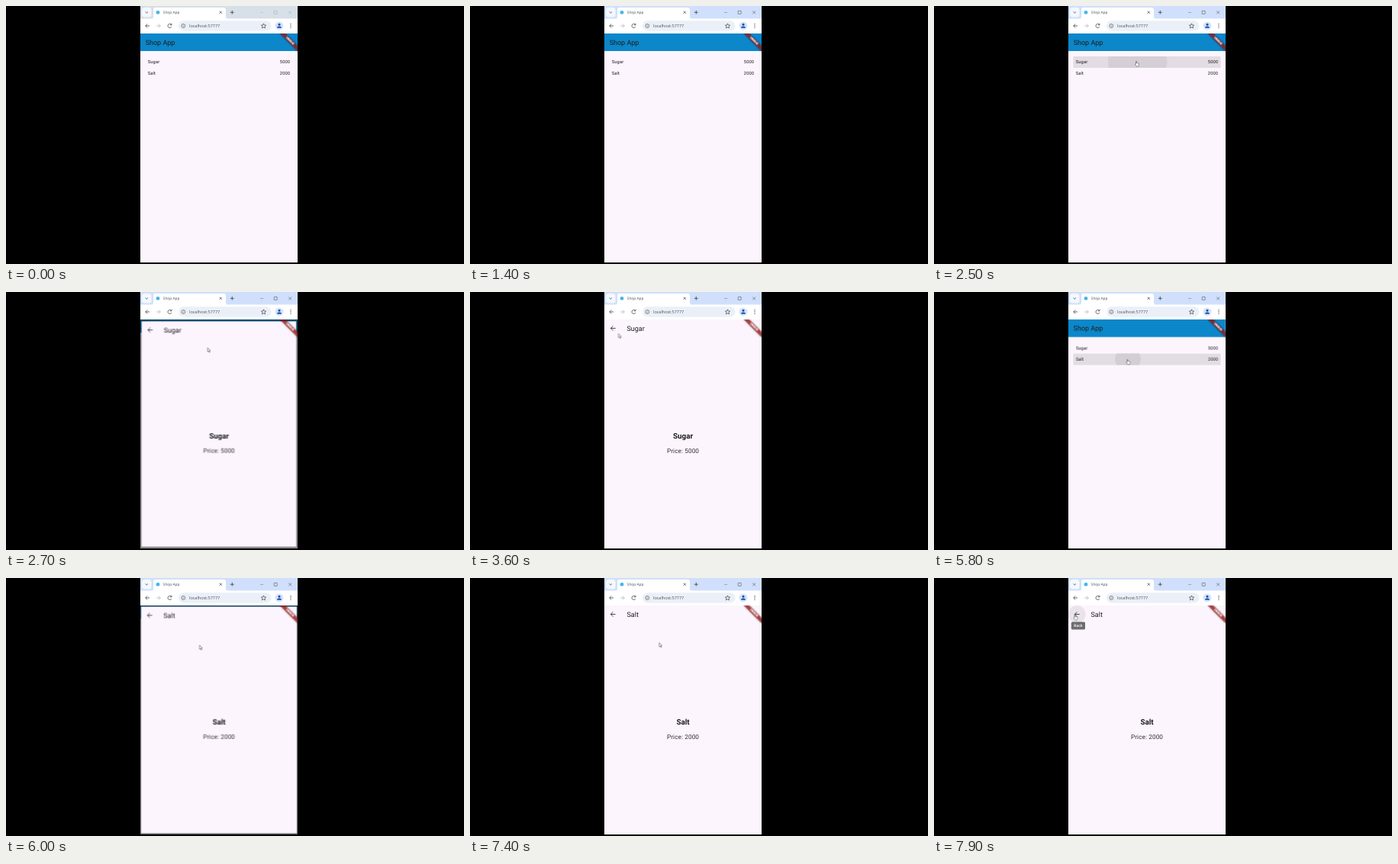
An HTML page that plays this animation: 600 by 338 pixels, repeating every 8000 ms.

```html
<!DOCTYPE html>
<html lang="en">
<head>
<meta charset="utf-8">
<title>Shop App</title>
<style>
  html, body { margin: 0; width: 100%; height: 100%; overflow: hidden; background: #000; }
  svg { display: block; width: 100vw; height: 100vh; }
  text { font-family: Roboto, Arial, sans-serif; fill: #1d1b20; text-rendering: geometricPrecision; }
  .ui text { font-family: "Open Sans", "Noto Sans", sans-serif; fill: #4a4d52; }
  .line { fill: none; stroke: #3c4043; stroke-width: .8; }
  .title { font-size: 9px; }
  .row { font-size: 5.76px; letter-spacing: .1px; }
  .end { text-anchor: end; }
  .name { font-size: 9.84px; font-weight: 700; text-anchor: middle; }
  .price { font-size: 8.2px; letter-spacing: .1px; text-anchor: middle; fill: #333136; }
  .page { transform-origin: 279px 186px; }

  /* One loop is 8 s, so 1% is 80 ms. */
  .anim { animation: 8s linear infinite; }
  .step { animation-timing-function: step-end; }
  #strip { animation-name: strip; }
  #controls { animation-name: controls; }
  #list { animation-name: list-zoom; }
  #detail { animation-name: detail-zoom, detail-fade; }
  #scrim { animation-name: scrim; }
  #sugar { animation-name: sugar; }
  #salt { animation-name: salt; }
  #hover1 { animation-name: hover1; }
  #hover2 { animation-name: hover2; }
  #ripple1 { animation-name: ripple1; transform-origin: 266.5px 73px; }
  #ripple2 { animation-name: ripple2; transform-origin: 254px 88px; }
  #backHover { animation-name: back-hover; }
  #tooltip { animation-name: tooltip; }
  #cursor { animation-name: move; }
  #arrow { animation-name: arrow; }
  #hand { animation-name: hand; }

  @keyframes strip { 0% { fill: #d7dfe8; } 17.5%, 100% { fill: #d0e0fc; } }
  @keyframes controls { 0% { stroke: #a7adb4; } 17.5%, 100% { stroke: #4b5058; } }

  @keyframes list-zoom {
    0%, 32.4% { transform: scale(1); animation-timing-function: cubic-bezier(.3, 0, .8, .15); }
    33.025% { transform: scale(1.02); animation-timing-function: cubic-bezier(.05, .7, .1, 1); }
    36.15%, 52.49% { transform: scale(1.05); }
    52.5% { transform: scale(1.1); animation-timing-function: cubic-bezier(.3, 0, .8, .15); }
    53.125% { transform: scale(1.06); animation-timing-function: cubic-bezier(.05, .7, .1, 1); }
    56.25%, 73.3% { transform: scale(1); animation-timing-function: cubic-bezier(.3, 0, .8, .15); }
    73.925% { transform: scale(1.02); animation-timing-function: cubic-bezier(.05, .7, .1, 1); }
    77.05%, 100% { transform: scale(1.05); }
  }
  @keyframes detail-zoom {
    0%, 32.4% { transform: scale(.85); animation-timing-function: cubic-bezier(.3, 0, .8, .15); }
    33.025% { transform: scale(.91); animation-timing-function: cubic-bezier(.05, .7, .1, 1); }
    36.15%, 52.5% { transform: scale(1); animation-timing-function: cubic-bezier(.3, 0, .8, .15); }
    53.125% { transform: scale(.96); animation-timing-function: cubic-bezier(.05, .7, .1, 1); }
    56.25% { transform: scale(.9); }
    56.26%, 73.3% { transform: scale(.85); animation-timing-function: cubic-bezier(.3, 0, .8, .15); }
    73.925% { transform: scale(.91); animation-timing-function: cubic-bezier(.05, .7, .1, 1); }
    77.05%, 100% { transform: scale(1); }
  }
  @keyframes detail-fade {
    0%, 32.87% { opacity: 0; }
    33.34%, 52.81% { opacity: 1; }
    53.28%, 73.77% { opacity: 0; }
    74.24%, 100% { opacity: 1; }
  }
  @keyframes scrim {
    0%, 33.18% { opacity: 0; }
    33.96%, 36.15% { opacity: .6; }
    36.16%, 74.08% { opacity: 0; }
    74.86%, 77.05% { opacity: .6; }
    77.06%, 100% { opacity: 0; }
  }
  @keyframes sugar { 0% { opacity: 1; } 60%, 100% { opacity: 0; } }
  @keyframes salt { 0% { opacity: 0; } 60%, 100% { opacity: 1; } }

  @keyframes hover1 {
    0%, 23.1% { opacity: 0; }
    23.7%, 35% { opacity: 1; }
    36%, 59% { opacity: 0; }
    59.4%, 60% { opacity: 1; }
    60.5%, 100% { opacity: 0; }
  }
  @keyframes hover2 {
    0%, 60.4% { opacity: 0; }
    61%, 75% { opacity: 1; }
    76%, 100% { opacity: 0; }
  }
  @keyframes ripple1 {
    0%, 29.8% { transform: scale(0); opacity: 1; }
    31.25% { transform: scale(1); opacity: 1; }
    34% { transform: scale(2.9); opacity: .8; }
    36%, 100% { transform: scale(2.9); opacity: 0; }
  }
  @keyframes ripple2 {
    0%, 71.9% { transform: scale(0); opacity: 1; }
    73.3% { transform: scale(1); opacity: 1; }
    75% { transform: scale(2.9); opacity: .8; }
    77%, 100% { transform: scale(2.9); opacity: 0; }
  }
  @keyframes back-hover {
    0%, 46% { opacity: 0; }
    46.7%, 53% { opacity: 1; }
    54%, 97.2% { opacity: 0; }
    97.9%, 100% { opacity: 1; }
  }
  @keyframes tooltip {
    0%, 46.4% { opacity: 0; }
    48%, 52.4% { opacity: 1; }
    53.2%, 97% { opacity: 0; }
    98.6%, 100% { opacity: 1; }
  }

  @keyframes move {
    0%, 18.5% { transform: translate(384px, 207px); }
    22% { transform: translate(300px, 118px); }
    24.5%, 32.4% { transform: translate(265px, 72px); }
    37%, 41% { transform: translate(262px, 75px); }
    45% { transform: translate(194.5px, 54.5px); }
    47.8%, 54.8% { transform: translate(184.5px, 48px); }
    56.25% { transform: translate(198px, 49px); }
    61.8%, 92% { transform: translate(253.5px, 88px); }
    98.2%, 100% { transform: translate(184.5px, 48px); }
  }
  @keyframes hand {
    0% { opacity: 0; }
    23.1% { opacity: 1; }
    33.3% { opacity: 0; }
    46.2% { opacity: 1; }
    55% { opacity: 0; }
    60.4% { opacity: 1; }
    74.2% { opacity: 0; }
    97.3%, 100% { opacity: 1; }
  }
  @keyframes arrow {
    0% { opacity: 1; }
    23.1% { opacity: 0; }
    33.3% { opacity: 1; }
    46.2% { opacity: 0; }
    55% { opacity: 1; }
    60.4% { opacity: 0; }
    74.2% { opacity: 1; }
    97.3%, 100% { opacity: 0; }
  }
</style>
</head>
<body>
<svg viewBox="0 0 600 338">
  <defs>
    <clipPath id="window"><rect x="176" width="206" height="336"/></clipPath>
    <clipPath id="app"><rect x="176" y="36" width="206" height="300"/></clipPath>
    <clipPath id="row1"><rect x="182.5" y="66" width="193" height="14.5"/></clipPath>
    <clipPath id="row2"><rect x="182.5" y="80.7" width="193" height="14.5"/></clipPath>
    <filter id="blur" x="-20%" y="-80%" width="140%" height="260%"><feGaussianBlur stdDeviation="1"/></filter>
  </defs>

  <g clip-path="url(#window)">
    <!-- Browser chrome -->
    <g class="ui">
      <rect id="strip" class="anim step" x="176" width="206" height="18"/>
      <rect x="178" y="2" width="12.5" height="12.5" rx="3.5" fill="#f4f8ff"/>
      <path class="line" d="M182.6 7.5l1.7 1.7 1.7-1.7"/>
      <path fill="#fff" d="M190 17q3 0 3-3V5q0-3 3-3H285q3 0 3 3V14q0 3 3 3Z"/>
      <circle cx="199" cy="8.4" r="2.4" fill="#45b5ee"/>
      <text x="205.8" y="10.3" font-size="4.8">Shop App</text>
      <path class="line" d="M279.8 6.8l3 3m0-3l-3 3M293.8 8.3h5m-2.5-2.5v5"/>
      <g id="controls" class="anim step" fill="none" stroke-width=".6">
        <path d="M333 8.5h4.2" opacity=".65"/>
        <rect x="351.2" y="6.4" width="4" height="4" rx=".5"/>
        <path d="M370.2 6.4l4 4m0-4l-4 4"/>
      </g>

      <rect x="176" y="16.5" width="206" height="19.5" fill="#fff"/>
      <path class="line" d="M188 26h-5.2m2.4-2.5l-2.5 2.5 2.5 2.5"/>
      <path class="line" style="stroke:#b4b7bb" d="M197 26h5.2m-2.4-2.5l2.5 2.5-2.5 2.5"/>
      <path class="line" d="M216.8 27a2.5 2.5 0 1 1-.5-2.8M217 22.8v2h-2"/>
      <rect x="226" y="19.3" width="121.500" height="13.4" rx="6.7" fill="#ebf0f8"/>
      <circle class="line" cx="232.300" cy="26" r="2.500" style="stroke-width:.6"/>
      <path class="line" style="stroke-width:.6" d="M232.3 25.7v1.6m0-2.8v.6"/>
      <text x="240" y="28" font-size="5.5">localhost:57777</text>
      <path class="line" style="stroke-width:.7" d="M337.500 22.900l.9 2.100 2.300.2-1.700 1.500.5 2.300-2-1.200-2 1.200.5-2.300-1.700-1.500 2.300-.2Z"/>
      <circle cx="358" cy="26" r="5.400" fill="#d3e3fd"/>
      <circle cx="358" cy="24.300" r="1.500" fill="#174ea6"/>
      <path d="M355.100 28.800q0-2.300 2.900-2.300t2.900 2.300Z" fill="#174ea6"/>
      <g fill="#3c4043">
        <circle cx="373" cy="23.700" r=".65"/>
        <circle cx="373" cy="26" r=".65"/>
        <circle cx="373" cy="28.300" r=".65"/>
      </g>
    </g>

    <g clip-path="url(#app)">
      <g id="list" class="page anim">
        <rect x="176" y="36" width="206" height="300" fill="#fcf5fd"/>
        <rect x="176" y="36" width="206" height="23" fill="#0c87c9"/>
        <text class="title" x="182.700" y="50.600">Shop App</text>
        <g clip-path="url(#row1)">
          <rect id="hover1" class="anim" x="182" y="66" width="194" height="15" fill="#000" fill-opacity=".1"/>
          <circle id="ripple1" class="anim" cx="266.500" cy="73" r="38.500" fill="#000" fill-opacity=".065"/>
        </g>
        <g clip-path="url(#row2)">
          <rect id="hover2" class="anim" x="182" y="80" width="194" height="16" fill="#000" fill-opacity=".1"/>
          <circle id="ripple2" class="anim" cx="254" cy="88" r="38.500" fill="#000" fill-opacity=".065"/>
        </g>
        <text class="row" x="185.800" y="75">Sugar</text>
        <text class="row end" x="372.200" y="75">5000</text>
        <text class="row" x="185.800" y="90">Salt</text>
        <text class="row end" x="372.200" y="90">2000</text>
      </g>

      <rect id="scrim" class="anim" x="176" y="36" width="206" height="300"/>

      <g id="detail" class="page anim">
        <rect x="176" y="36" width="206" height="300" fill="#fcf5fd"/>
        <circle id="backHover" class="anim" cx="187.300" cy="47.500" r="11.400" fill="#1d1b20" fill-opacity=".08"/>
        <path class="line" style="stroke:#1d1b20" d="M190.600 47.500h-6.200m3-3.100l-3.100 3.100 3.100 3.100"/>
        <g id="sugar" class="anim step">
          <text class="title" x="205.500" y="50.600">Sugar</text>
          <text class="name" x="279" y="192">Sugar</text>
          <text class="price" x="279" y="210.800">Price: 5000</text>
        </g>
        <g id="salt" class="anim step">
          <text class="title" x="205.500" y="50.600">Salt</text>
          <text class="name" x="279" y="192">Salt</text>
          <text class="price" x="279" y="210.800">Price: 2000</text>
        </g>
      </g>

      <g id="tooltip" class="anim">
        <rect x="179.800" y="57.500" width="18.200" height="10" rx="1.600" fill="#616161" fill-opacity=".92"/>
        <text x="188.900" y="64.200" font-size="4.900" font-weight="500" letter-spacing=".15" text-anchor="middle" style="fill:#fff">Back</text>
      </g>

      <!-- Debug ribbon -->
      <g transform="translate(382 36) rotate(45)">
        <rect x="-16.400" y="11.500" width="32.800" height="4.900" opacity=".5" filter="url(#blur)"/>
        <rect x="-16.400" y="11.500" width="32.800" height="4.900" fill="#b71c1c" fill-opacity=".63"/>
        <text y="15.450" font-size="4.200" font-weight="900" text-anchor="middle" style="fill:#fff">DEBUG</text>
      </g>
    </g>

    <g id="cursor" class="anim" fill="#fff" stroke="#333" stroke-width=".5" stroke-linejoin="round">
      <path id="arrow" class="anim step" d="M0 0V5.400L1.300 4.200 2.200 6.300 3.100 5.900 2.200 3.900H3.900Z"/>
      <path id="hand" class="anim step" d="M-.5 .5Q0-.3 .5 .5V2.600Q1.200 2.100 1.600 2.800 2.300 2.500 2.600 3.100 3.400 2.900 3.400 3.700V5.200Q3.200 6.300 2.700 7H.2Q-.7 5.700-1.500 4.400-1.500 3.500-.5 4.200Z"/>
    </g>
  </g>
</svg>
</body>
</html>
```
